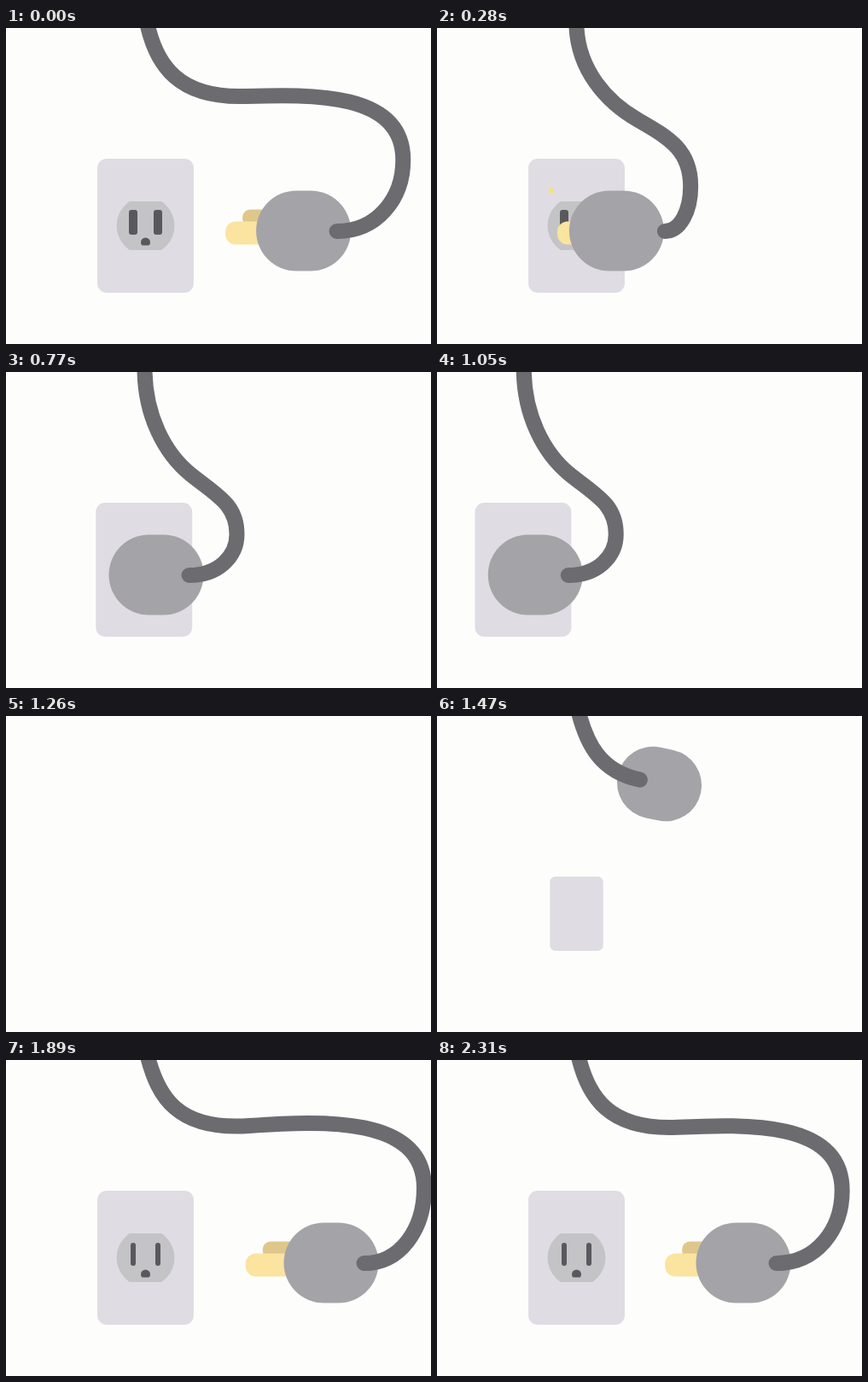
An HTML page that plays this animation: 498x370 px, repeating every 2.38 s.

```html
<!DOCTYPE html>
<html lang="en">
<head>
<meta charset="utf-8">
<title>Plug and socket</title>
<style>
html, body { margin: 0; width: 100%; height: 100%; overflow: hidden; background: #fdfefc; }
svg { display: block; width: 100vw; height: 100vh; }
</style>
</head>
<body>
<svg viewBox="0 0 498 370">
  <defs>
    <clipPath id="faceClip"><rect x="-36" y="-28.5" width="72" height="57"/></clipPath>
    <clipPath id="holeClip"><rect x="-8" y="10" width="16" height="13"/></clipPath>
  </defs>
  <g id="scene">
    <g id="plate">
      <rect x="-56.5" y="-78.5" width="113" height="157" rx="11" fill="#dfdde3"/>
      <g id="face">
        <circle r="34" fill="#c4c4c6" clip-path="url(#faceClip)"/>
        <rect id="slotL" rx="3" fill="#59595d"/>
        <rect id="slotR" rx="3" fill="#59595d"/>
        <circle cy="19.5" r="5.5" fill="#59595d" clip-path="url(#holeClip)"/>
      </g>
    </g>
    <g id="sparks" fill="#f3e27a"></g>
    <g id="plug">
      <rect id="backProng" y="-25" height="20" rx="9" fill="#dfc78b"/>
      <rect id="frontProng" y="-11" height="27" rx="12" fill="#fbe3a0"/>
      <rect x="-55.5" y="-47" width="111" height="94" rx="47" fill="#a4a3a8"/>
    </g>
    <path id="cord" fill="none" stroke="#6c6b70" stroke-width="18" stroke-linecap="round"/>
  </g>
</svg>
<script>
const STEP = 70, COUNT = 34, START = 18, SPARKS = 5;
const $ = id => document.getElementById(id);
const set = (el, attrs) => { for (const k in attrs) el.setAttribute(k, attrs[k]); };
const show = on => on ? "visible" : "hidden";
const mix = (a, b, k) => a + (b - a) * k;
const ease = (from, to, t) => {
  const p = Math.min(1, Math.max(0, (t - from) / (to - from)));
  return p * p * (3 - 2 * p);
};
// Grows past 1 by "over", then settles.
const pop = (from, peak, settle, over, t) =>
  (1 + over) * ease(from, peak, t) - over * ease(peak, settle, t);

const sparks = Array.from({ length: SPARKS }, () => {
  const el = document.createElementNS("http://www.w3.org/2000/svg", "ellipse");
  set(el, { rx: 4, ry: 2.5 });
  $("sparks").append(el);
  return el;
});

// Drift while waiting, then a fast push into the socket.
const plugX = m => 381 - 22 * ease(27, 33, m) - 182.5 * ease(33, 39.9, m);

// The cord hangs from the top, bends once, turns at the right and ends on the plug.
function drawCord(m) {
  const x = plugX(m), push = ease(33, 39.9, m);
  const f = (x - 176.5) / 204.5;
  const k = (f + ease(0, 1, f)) / 2, lift = k ** .6;
  const endX = x + 38.5 + 146 * push * push * (1 - push), endY = 238;
  const topX = mix(163, 166, k);
  const bendX = mix(217, 285, lift), bendY = mix(120, 77, lift);
  const pullX = mix(31, 85, k), pullY = mix(25, -6, k);
  const sideX = mix(271, 490, k), sideY = mix(190, 150, k);
  set($("cord"), { d: `M${topX},-4
    C${topX + 12 * k},${mix(50, 42, k)} ${bendX - pullX},${bendY - pullY} ${bendX},${bendY}
    S${sideX},${sideY - mix(35, 85, k)} ${sideX},${sideY}
    C${sideX},${mix(sideY, endY, .55)} ${mix(endX, sideX, .6)},${endY} ${endX},${endY}` });
}

function drawPlate(m) {
  const x = 163.5 - 1.3 * ease(38, 41, m);
  set($("plate"), { transform: `translate(${x} 231.5) scale(${pop(18.15, 24, 26, .15, m)})` });
  set($("face"), { transform: `scale(${pop(21, 24, 26, .12, m)})` });
  const w = 6 + 4 * ease(33, 34, m), h = 24 + w / 2;
  const slot = (id, cx) => set($(id), { x: cx - w / 2, y: -4 - h / 2, width: w, height: h });
  slot("slotL", -14.5);
  slot("slotR", 14.5);
}

function drawPlug(m) {
  const cord = $("cord"), total = cord.getTotalLength();
  const grown = ease(19.3, 25, m), len = total * grown;
  let x = plugX(m), y = 237.5, turn = 0;
  let reach = -20 + 66 * ease(22, 25, m) - 10 * ease(25, 34, m);
  if (grown < 1) {
    // Ride on the tip of the growing cord.
    const tip = cord.getPointAtLength(len);
    const from = cord.getPointAtLength(Math.max(0, len - 2));
    const angle = Math.atan2(tip.y - from.y, tip.x - from.x);
    const offset = mix(19, 38.5, grown);
    x = tip.x + Math.cos(angle) * offset;
    y = tip.y + Math.sin(angle) * offset;
    turn = angle * 180 / Math.PI + 180;
  } else {
    // The prong sinks into the slot.
    reach = Math.max(-20, Math.min(reach, x - 55.5 - 141));
  }
  const visibility = show(grown > 0);
  set(cord, { visibility, "stroke-dasharray": grown < 1 ? `${len} ${total + 50}` : "none" });
  set($("plug"), {
    visibility,
    transform: `translate(${x} ${y}) rotate(${turn}) scale(${.6 + .4 * ease(18, 22.5, m)})`
  });
  const prong = (id, r) => set($(id), { x: -55.5 - r, width: 55.5 + r });
  prong("frontProng", reach);
  prong("backProng", Math.max(-20, reach - 20));
}

function drawSparks(m) {
  const spread = mix(.585, 1, (m - 38) / 4);
  sparks.forEach((el, i) => {
    const deg = 225 + i * 360 / SPARKS, a = deg * Math.PI / 180;
    const x = 163 + 70 * spread * Math.cos(a), y = 231 + 98 * spread * Math.sin(a);
    set(el, {
      transform: `translate(${x} ${y}) rotate(${deg})`,
      visibility: show(m >= 38 + i / SPARKS && m <= 42)
    });
  });
}

function render(ms) {
  const n = Math.floor(ms / STEP) % COUNT;
  const m = n < START ? n + COUNT : n;
  const exit = -.49 * Math.max(0, m - 44) ** 3;
  set($("scene"), { transform: `translate(${exit} 0)` });
  drawCord(m);
  drawPlate(m);
  drawPlug(m);
  drawSparks(m);
}

const t0 = performance.now();
function tick() {
  render(performance.now() - t0);
  requestAnimationFrame(tick);
}
tick();
</script>
</body>
</html>
```
